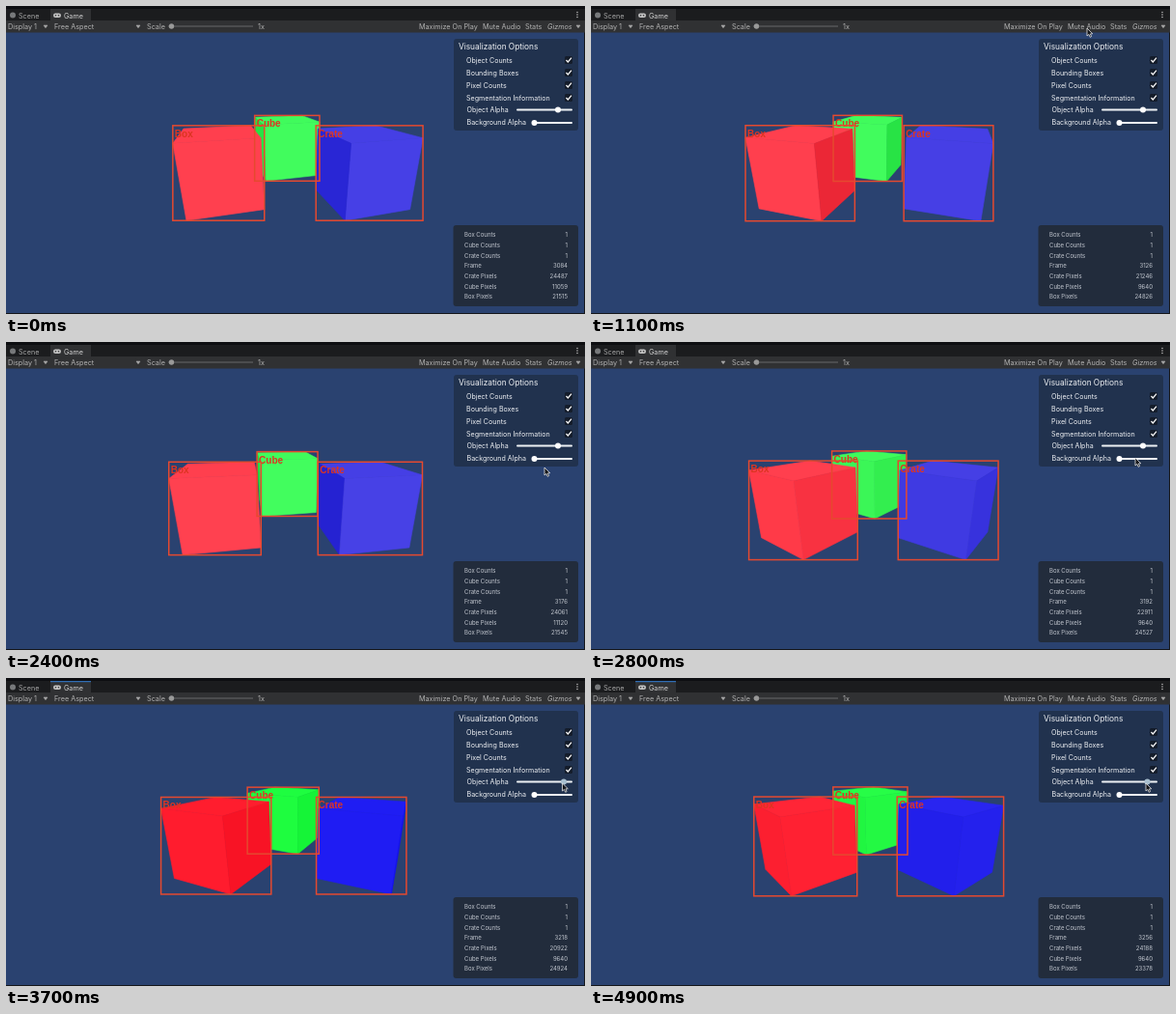
Recreate the animation shown at these times as an HTML page with a canvas. Size 600 px wide and 319 px high, loop 5000 ms.

```html
<!DOCTYPE html>
<html>
<head>
<meta charset="utf-8">
<style>
html, body { margin: 0; width: 100%; height: 100%; overflow: hidden; background: #2a4270; }
canvas { display: block; }
</style>
</head>
<body>
<canvas id="stage" width="600" height="319"></canvas>
<script>
const ctx = document.getElementById('stage').getContext('2d');
const FOCAL = 252, MID_X = 300, MID_Y = 172.5, PITCH = Math.PI / 9;
const CAM_H = 0.63, RADIUS = Math.SQRT1_2, RAD = Math.PI / 180;
const PIXELS_PER_AREA = 2.75;

// time, x, y
const pointerPath = [
  [0, 500, -60], [1100, 514, 23], [1600, 579, 62], [2400, 558, 130],
  [3200, 570, 110], [4200, 583, 108], [4900, 575, 109]
];

// skin is the material's tint under the segmentation colour
const cubes = [
  { name: 'Cube', x: -0.2, z: 4.66, rgb: [2, 255, 40], skin: [1, 1, 1] },
  { name: 'Box', x: -1.055, z: 3.32, rgb: [255, 0, 20], skin: [1.2, 1, 1] },
  { name: 'Crate', x: 0.96, z: 3.32, rgb: [0, 0, 255], skin: [1.1, 1, 0.65] }
];

const clamp = v => Math.max(0, Math.min(1, v));

function pointerAt(t) {
  const i = Math.max(1, pointerPath.findIndex(p => p[0] >= t));
  const [t0, x0, y0] = pointerPath[i - 1], [t1, x1, y1] = pointerPath[i];
  const k = (t - t0) / (t1 - t0);
  return [x0 + (x1 - x0) * k, y0 + (y1 - y0) * k];
}

function project(x, drop, z) {
  const depth = z * Math.cos(PITCH) + drop * Math.sin(PITCH);
  const down = drop * Math.cos(PITCH) - z * Math.sin(PITCH);
  return [MID_X + FOCAL * x / depth, MID_Y + FOCAL * down / depth];
}

function signedArea(points) {
  return points.reduce((sum, p, i) => {
    const q = points[(i + 1) % points.length];
    return sum + (p[0] * q[1] - q[0] * p[1]) / 2;
  }, 0);
}

function poly(points, fill, edge = fill, width = 0.6) {
  ctx.beginPath();
  points.forEach(p => ctx.lineTo(p[0], p[1]));
  ctx.closePath();
  ctx.fillStyle = fill;
  ctx.fill();
  ctx.strokeStyle = edge;
  ctx.lineWidth = width;
  ctx.stroke();
}

function rect(x, y, w, h, fill, r = 0) {
  ctx.fillStyle = fill;
  ctx.beginPath();
  ctx.roundRect(x, y, w, h, r);
  ctx.fill();
}

function dot(x, y, r, fill) {
  ctx.fillStyle = fill;
  ctx.beginPath();
  ctx.arc(x, y, r, 0, 7);
  ctx.fill();
}

function text(str, x, y, size, fill, align = 'left', style = '') {
  ctx.font = `${style} ${size}px Inter, sans-serif`;
  ctx.textAlign = align;
  ctx.fillStyle = fill;
  ctx.fillText(str, x, y);
}

// Returns the bounds and the silhouette's area
function drawCube(cube, turn, alpha) {
  const top = [], bottom = [];
  for (let k = 0; k < 4; k++) {
    const a = (turn + 90 * k) * RAD;
    const x = cube.x + RADIUS * Math.sin(a), z = cube.z - RADIUS * Math.cos(a);
    top.push(project(x, CAM_H, z));
    bottom.push(project(x, CAM_H + 1, z));
  }
  const shade = light => `rgb(${cube.rgb.map((c, i) =>
    Math.round(c * alpha + light * cube.skin[i] * (1 - alpha)))})`;
  const seen = [...top];
  let area = Math.abs(signedArea(top));
  poly(top, shade(240));
  for (let k = 0; k < 4; k++) {
    const n = (k + 1) % 4, face = [top[k], top[n], bottom[n], bottom[k]];
    const size = signedArea(face);
    if (size <= 0) continue;
    const normal = (turn + 90 * k + 45) * RAD;
    poly(face, shade(100 + 150 * Math.max(0, Math.cos(normal))));
    seen.push(bottom[k], bottom[n]);
    area += size;
  }
  const xs = seen.map(p => p[0]), ys = seen.map(p => p[1]);
  const left = Math.min(...xs), up = Math.min(...ys);
  return { box: [left, up, Math.max(...xs) - left, Math.max(...ys) - up], area };
}

function drawFrame(name, box) {
  ctx.strokeStyle = '#e5492f';
  ctx.lineWidth = 1.5;
  ctx.strokeRect(...box);
  ctx.font = 'bold 10px "Liberation Sans", Arial, sans-serif';
  ctx.textAlign = 'left';
  ctx.fillStyle = '#dc3522';
  ctx.fillText(name, box[0] + 2, box[1] + 12);
}

function drawToolbar(focused) {
  rect(0, 0, 600, 15, '#1b1c1e');
  rect(0, 0, 600, 3, '#0d0e11');
  rect(46, 3, 42, 12, '#303133');
  if (focused) rect(46, 3, 42, 1.3, '#2f6cb4');
  rect(0, 15, 600, 12.5, '#303133');
  dot(7, 9.5, 3, '#77797b');
  text('Scene', 13, 12.5, 7.2, '#a6a6a6');
  rect(49, 7.5, 8, 4.5, '#c4c4c4', 2.2);
  for (const x of [51.5, 54.5]) dot(x, 9.7, 0.8, '#303133');
  text('Game', 60, 12.5, 7.2, '#d2d2d2');
  for (const y of [6.5, 9, 11.5]) dot(592, y, 0.8, '#b4b4b4');

  const label = (str, x, style) => text(str, x, 24, 7.25, '#b2b2b2', 'left', style);
  label('Display 1', 2);
  label('Free Aspect', 50);
  label('Scale', 146);
  rect(168, 20.5, 88, 1, '#66686a');
  dot(171.5, 21, 2.7, '#999');
  label('1x', 261);
  label('Maximize On Play', 428);
  label('Mute Audio', 494);
  label('Stats', 538);
  label('Gizmos', 561, 'italic');
  for (const x of [41, 137, 593]) poly([[x - 2, 20], [x + 2, 20], [x, 22.7]], '#a8a8a8');
}

function slider(x, y, knob, fill) {
  rect(x, y - 1, 587 - x, 2, '#eef1f4', 1);
  dot(knob, y, 3, fill);
}

function drawOptions(knob, held) {
  const white = '#f0f2f5';
  rect(464, 34, 129, 95, '#21324e', 3);
  text('Visualization Options', 469, 45, 8.3, white);
  ['Object Counts', 'Bounding Boxes', 'Pixel Counts', 'Segmentation Information'].forEach((label, i) => {
    const y = 56 + 13 * i;
    text(label, 477, y + 2.7, 7.1, white);
    rect(579, y - 4, 8, 8, '#141c2a', 1.5);
    ctx.strokeStyle = '#fff';
    ctx.lineWidth = 1.2;
    ctx.beginPath();
    ctx.moveTo(580.5, y);
    ctx.lineTo(582.3, y + 2);
    ctx.lineTo(586, y - 2.3);
    ctx.stroke();
  });
  text('Object Alpha', 477.5, 110, 7.1, white);
  text('Background Alpha', 477.5, 123.3, 7.1, white);
  slider(529, 107.5, knob, held ? '#a9c0d0' : '#fff');
  slider(545, 121, 547.5, '#fff');
}

function drawStats(frame, cube, box, crate) {
  rect(463.5, 227, 129.5, 84, '#222c3c', 3);
  const rows = { 'Box Counts': 1, 'Cube Counts': 1, 'Crate Counts': 1, 'Frame': frame,
    'Crate Pixels': crate, 'Cube Pixels': cube, 'Box Pixels': box };
  Object.entries(rows).forEach(([label, value], i) => {
    const y = 239.2 + 10.67 * i;
    text(label, 475, y, 6, '#c3c8d0');
    text(Math.round(value), 582, y, 6, '#c3c8d0', 'right');
  });
}

function drawPointer(x, y) {
  const shape = [[0, 0], [0, 8], [1.9, 6.4], [3.2, 9.3], [4.6, 8.6], [3.4, 5.9], [5.8, 5.7]];
  poly(shape.map(p => [x + p[0], y + p[1]]), '#15171b', '#e6e6e6', 0.8);
}

function draw() {
  const t = Math.floor(performance.now() % 5000 / 100) * 100;
  // The counter slows while the slider is first dragged
  const frame = 3084 + Math.floor(0.0384 * t - 16 * clamp((t - 3200) / 1000) + 0.6);
  const turn = -28 - 3 * (frame - 3084);
  const [px, py] = pointerAt(t);
  const held = t > 3200;
  const knob = held ? px + 1.5 : 572;
  const alpha = clamp(1 - (583 - knob) / 42);

  rect(0, 0, 600, 319, '#14161a');
  rect(0, 0, 599, 318, '#2a4270');
  const views = cubes.map(c => drawCube(c, turn, alpha));
  cubes.forEach((c, i) => drawFrame(c.name, views[i].box));
  drawToolbar(t >= 3200);
  drawOptions(knob, held);

  // The rear cube shows most when the front two turn their corners away
  const gap = Math.max(0, Math.cos(4 * (turn + 32) * RAD));
  const [, box, crate] = views.map(v => v.area * PIXELS_PER_AREA);
  drawStats(frame, 9640 + 1500 * gap ** 1.4, box, crate);
  drawPointer(px, py);
  requestAnimationFrame(draw);
}
draw();
</script>
</body>
</html>
```
